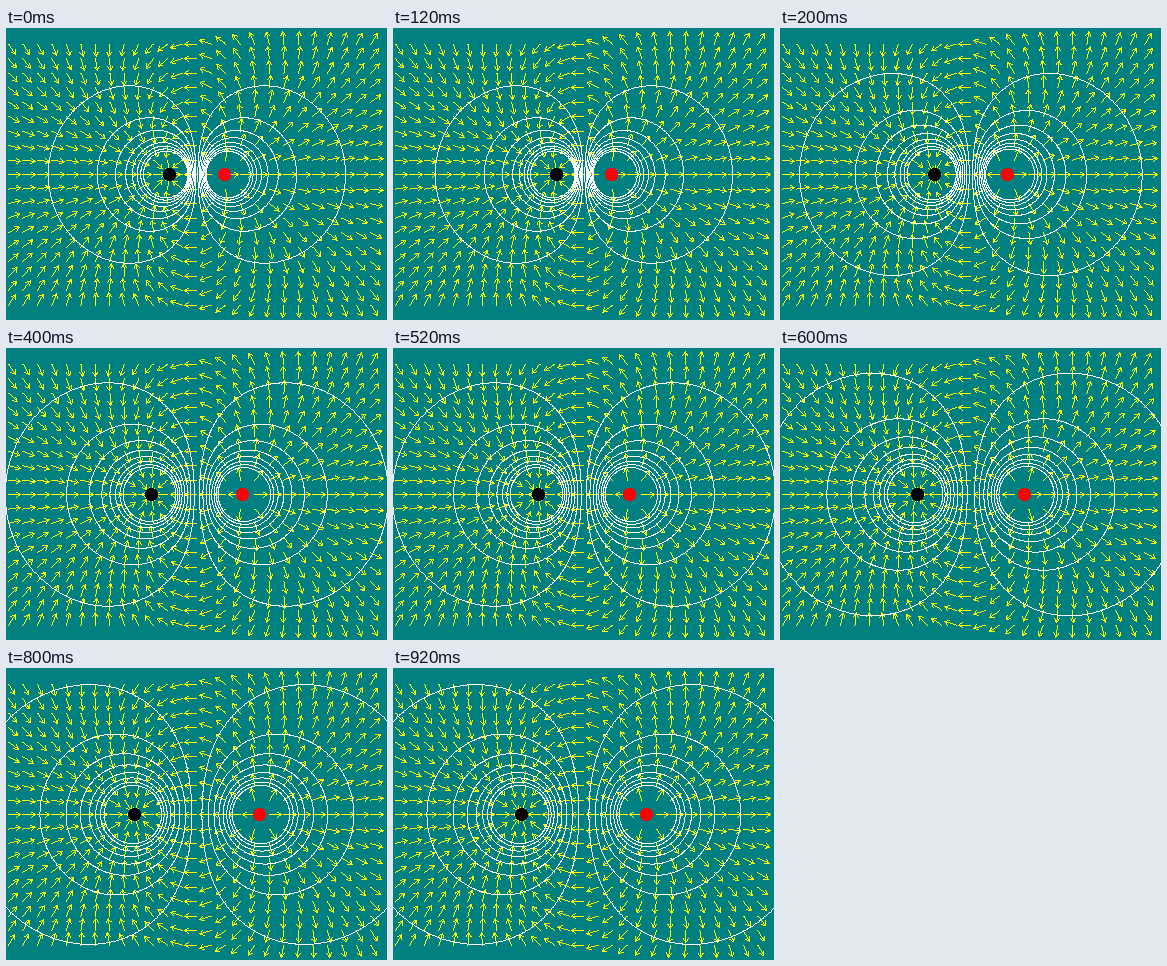
Recreate the animation shown at these times as an HTML page with a canvas. Size 381 px wide and 292 px high, loop 1000 ms.

```html
<!DOCTYPE html>
<html>
<head>
<meta charset="utf-8">
<title>Field of two moving charges</title>
<style>
html, body { margin: 0; width: 100%; height: 100%; overflow: hidden; background: #008080; }
canvas { display: block; width: 381px; height: 292px; image-rendering: pixelated; }
</style>
</head>
<body>
<canvas id="stage" width="381" height="292"></canvas>
<script>
const ctx = document.getElementById('stage').getContext('2d');
const CX = 190.4, CY = 146, PITCH = 14.5;
const POSES = 5, HOLD = 200;
const LEVELS = 8, FIRST = 0.0026, STEP = 0.00343;

// One-pixel line without smoothing
function line(x0, y0, x1, y1) {
  const n = Math.max(1, Math.ceil(Math.max(Math.abs(x1 - x0), Math.abs(y1 - y0))));
  for (let i = 0; i <= n; i++) {
    ctx.fillRect(Math.round(x0 + (x1 - x0) * i / n), Math.round(y0 + (y1 - y0) * i / n), 1, 1);
  }
}

// Potential of a positive charge at x = a and a negative one at x = -a
function potential(x, y, a) {
  return 1 / Math.hypot(x - a, y) - 1 / Math.hypot(x + a, y);
}

function fieldAngle(x, y, a) {
  const p = Math.hypot(x - a, y) ** 3 + 1e-6, n = Math.hypot(x + a, y) ** 3 + 1e-6;
  return Math.atan2(y / p - y / n, (x - a) / p - (x + a) / n);
}

function arrow(x, y, angle) {
  const c = Math.cos(angle), s = Math.sin(angle);
  const tx = x + 12.3 * c, ty = y + 12.3 * s;
  line(x, y, tx, ty);
  for (const side of [-2.5, 2.5]) {
    line(tx, ty, tx - 4 * c - side * s, ty - 4 * s + side * c);
  }
}

function drawField(a) {
  ctx.fillStyle = '#ffff00';
  for (let row = -9; row <= 9; row++) {
    for (let col = -13; col <= 12; col++) {
      const x = col * PITCH, y = row * PITCH;
      arrow(CX + x, CY + y, fieldAngle(x, y, a));
    }
  }
}

// Trace the closed contour around the positive charge and mirror it
function drawContour(level, a) {
  const n = 240;
  let px, py;
  for (let i = 0; i <= n; i++) {
    const t = i / n * 2 * Math.PI, c = Math.cos(t), s = Math.sin(t);
    let lo = 0.01, hi = 400;
    for (let k = 0; k < 24; k++) {
      const r = (lo + hi) / 2;
      if (potential(a + r * c, r * s, a) > level) lo = r;
      else hi = r;
    }
    const x = a + lo * c, y = lo * s;
    if (i) {
      line(CX + px, CY + py, CX + x, CY + y);
      line(CX - px, CY + py, CX - x, CY + y);
    }
    px = x;
    py = y;
  }
}

function disc(x, color) {
  ctx.fillStyle = color;
  for (let dy = -6; dy <= 6; dy++) {
    const w = Math.floor(Math.sqrt(42 - dy * dy));
    ctx.fillRect(Math.round(x) - w, CY + dy, 2 * w + 1, 1);
  }
}

function draw(a) {
  ctx.fillStyle = '#008080';
  ctx.fillRect(0, 0, 381, 292);
  drawField(a);
  ctx.fillStyle = '#ffffff';
  for (let i = 0; i < LEVELS; i++) drawContour(FIRST + i * STEP, a);
  disc(CX - a, '#000000');
  disc(CX + a, '#ff0000');
}

let shown = -1;
const start = performance.now();
function tick() {
  const pose = Math.floor((performance.now() - start) / HOLD) % POSES;
  if (pose !== shown) {
    shown = pose;
    draw(27.7 + 8.7 * pose);
  }
  requestAnimationFrame(tick);
}
tick();
</script>
</body>
</html>
```
